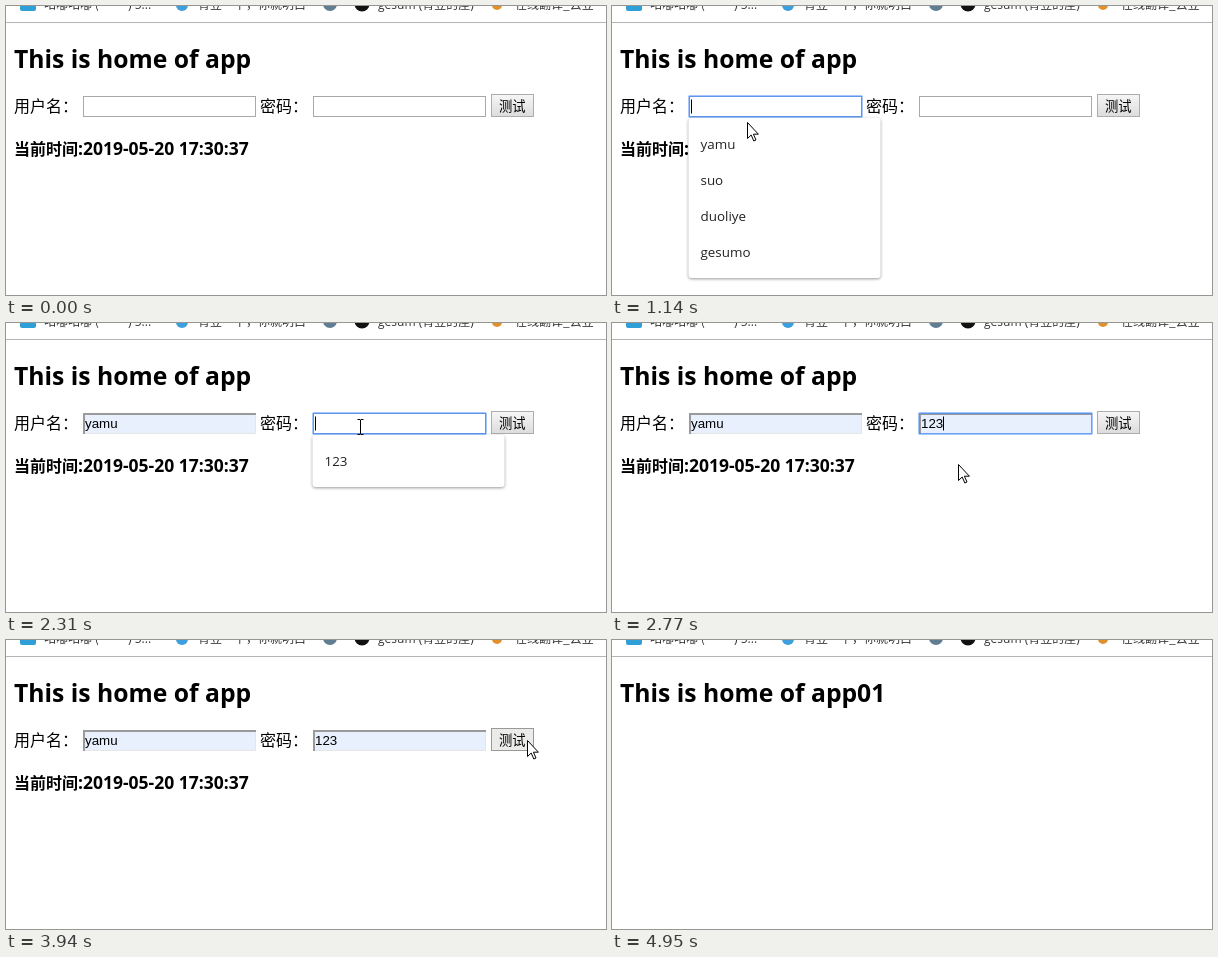
Animation of 600 by 289 pixels, one loop 5.67 s. Source, as an HTML page:

```html
<!DOCTYPE html>
<html lang="zh">
<head>
<meta charset="utf-8">
<style>
  html, body { margin: 0; width: 100%; height: 100%; overflow: hidden; background: #fff; }
  svg { display: block; width: 600px; height: 289px; }
  text { font: 16px "Open Sans", "Noto Sans CJK SC", "Noto Sans CJK", sans-serif; white-space: pre; }
  .cjk { font-family: "Noto Sans CJK SC", "Noto Sans CJK", sans-serif; }
  .bold { font-weight: 700; }
  .bar text { font-size: 12px; fill: #333; }
  .menu { filter: drop-shadow(0 1px 1.5px rgba(0, 0, 0, .4)); }
  .menu text { font-size: 13.4px; fill: #222; }
  .field text { font: 13.33px "Liberation Sans", sans-serif; }
  #button { fill: url(#face); stroke: #adadad; }
  #button.hover { fill: #ebebe9; stroke: #999; }
</style>
</head>
<body>
<svg viewBox="0 0 600 289">
  <defs>
    <linearGradient id="face" x2="0" y2="1">
      <stop stop-color="#f6f6f6"/><stop offset="1" stop-color="#dcdcdc"/>
    </linearGradient>
  </defs>
  <g class="bar">
    <rect x="14" y="-9" width="16" height="14" rx="2" fill="#2f9fd8"/>
    <text class="cjk" x="38" y="3">咕嘟咕嘟 (</text>
    <text x="122" y="3">) 5...</text>
    <circle cx="176" cy="-1" r="6" fill="#3d9fdc"/>
    <text class="cjk" x="192" y="3">青豆一下，你就明白</text>
    <circle cx="324" cy="-2" r="7" fill="#607d92"/>
    <circle cx="356" cy="-2" r="7.5" fill="#111"/>
    <text x="372" y="3">gesum (青豆的屋)</text>
    <circle cx="491" cy="-1" r="5" fill="#e0912c"/>
    <text class="cjk" x="509" y="3">在线翻译_云豆</text>
    <path d="M0 16.5H600" stroke="#b4b4b4"/>
  </g>
  <text id="title" class="bold" x="8" y="62" style="font-size:24.7px"></text>
  <g id="form">
    <text class="cjk" x="8" y="106">用户名：</text>
    <text class="cjk" x="254" y="106">密码：</text>
    <g id="fields"></g>
    <rect id="button" x="485.5" y="88.5" width="42" height="22"/>
    <text class="cjk" x="493" y="105" style="font-size:13.33px">测试</text>
    <text class="cjk bold" x="8" y="149">当前时间</text>
    <text class="bold" x="72" y="149" style="font-size:17.5px">:2019-05-20 17:30:37</text>
    <g id="menus"></g>
  </g>
  <g id="pointer">
    <path id="arrow" d="M.5.5v16l3.7-3.5 2.6 6 2.2-1-2.6-5.8h5z" fill="#fff" stroke="#000"/>
    <path id="beam" d="M-3-7.5h2.5l.5.5.5-.5H3M-3 7.5h2.5L0 7l.5.5H3M0-7V7" fill="none" stroke="#000"/>
  </g>
</svg>
<script>
const LOOP = 5670;
const STEP = 77; // the pointer moves in steps of this many ms
const SUBMIT = 4020;
const $ = id => document.getElementById(id);
const show = (id, on) => $(id).style.display = on ? "" : "none";
const between = (t, a, b) => t >= a && t < b;

const user = { id: "user", x: 77, value: "yamu", options: ["yamu", "suo", "duoliye", "gesumo"],
               opened: 900, hovered: 1215, chosen: 1540, blurred: 2225 };
const pass = { id: "pass", x: 307, value: "123", options: ["123"],
               opened: 2225, hovered: 2455, chosen: 2770, blurred: 3855 };
const fields = [user, pass];

const fieldMarkup = ({ id, x, value }) => `
  <g class="field" transform="translate(${x} 90)">
    <rect x=".5" y=".5" width="172" height="20" fill="#fff" stroke="#a9a9a9"/>
    <g id="${id}Fill">
      <rect width="173" height="21" fill="#e8f0fe"/>
      <path d="M1 21V1H173" fill="none" stroke="#9a9a9a" stroke-width="2"/>
      <path d="M2 20.5H172.5V2" fill="none" stroke="#e6e6e6"/>
      <text id="${id}Text" x="2" y="15">${value}</text>
    </g>
    <g id="${id}Ring" fill="none" stroke="#4d90fe">
      <rect x="-.5" y="-.5" width="174" height="22" rx="1" stroke-opacity=".5"/>
      <rect x=".5" y=".5" width="172" height="20" stroke-opacity=".8"/>
    </g>
    <path id="${id}Caret" d="M.5 3.5v14" stroke="#000"/>
  </g>`;

const menuMarkup = ({ id, x, options }) => `
  <g id="${id}Menu" class="menu" transform="translate(${x - .5} 112)">
    <rect width="192" height="${16 + 36 * options.length}" rx="3" fill="#fff"/>
    <rect id="${id}Hover" y="9" width="192" height="36" fill="#eee"/>
    ${options.map((s, i) => `<text x="12" y="${31 + 36 * i}">${s}</text>`).join("")}
  </g>`;

$("fields").innerHTML = fields.map(fieldMarkup).join("") +
  `<path id="squiggle" d="M79 107${"l2-2 2 2".repeat(8)}" fill="none" stroke="#e0543a" stroke-width=".8"/>`;
$("menus").innerHTML = fields.map(menuMarkup).join("");

// Each move starts where the last one ended; bend pushes its middle sideways.
const moves = [];
let rest = [282, 257];
function move(from, to, goal, bend = [0, 0]) {
  moves.push({ from, to, start: rest, goal, bend });
  rest = goal;
}
move(70, 440, [155, 91]);
move(590, 750, [160, 99]);
move(990, 1300, [114, 140], [-2, -4]);
move(user.chosen, 1860, [180, 115], [-75, 0]);
move(1920, 2310, [354, 104]);
move(2310, 2540, [346, 141]);
move(pass.chosen, 3940, [521, 100], [0, -14]);
move(4190, 4810, [360, 235], [-150, 0]);
move(4810, 4950, [628, 309]);

function pointerAt(t) {
  const { from, to, start, goal, bend } = moves.findLast(m => t >= m.from);
  const steps = Math.round((to - from) / STEP);
  const u = Math.min(1, Math.floor((t - from) / (to - from) * steps + .15) / steps);
  return start.map((s, k) => Math.round(s + (goal[k] - s) * u + bend[k] * 4 * u * (1 - u)));
}

function drawField({ id, opened, hovered, chosen, blurred }, t) {
  const focused = between(t, opened, blurred);
  const caretOn = t < chosen || (t - chosen) % 1000 < 460;
  show(id + "Fill", t >= hovered);
  show(id + "Hover", t >= hovered);
  show(id + "Ring", focused);
  show(id + "Menu", between(t, opened, chosen));
  show(id + "Caret", focused && caretOn);
  const textEnd = t < chosen ? 0 : Math.round($(id + "Text").getComputedTextLength());
  $(id + "Caret").setAttribute("transform", `translate(${2 + textEnd} 0)`);
}

function drawPointer(t) {
  const visible = between(t, 70, 4950);
  show("pointer", visible);
  const [x, y] = visible ? pointerAt(t) : [0, 0];
  const overRow = between(y, 90, 112);
  const overDate = between(y, 134, 152) && x < 243 && !between(t, user.opened, user.chosen);
  const beam = t < SUBMIT && (overRow && x < 481 || overDate);
  show("beam", beam);
  show("arrow", !beam);
  $("pointer").setAttribute("transform", `translate(${x + (beam ? .5 : 0)} ${y})`);
  $("button").classList.toggle("hover", overRow && between(x, 485, 529));
}

function draw(t) {
  $("title").textContent = "This is home of app" + (t < SUBMIT ? "" : "01");
  show("form", t < SUBMIT);
  show("squiggle", between(t, user.chosen, user.blurred));
  fields.forEach(f => drawField(f, t));
  drawPointer(t);
}

const begin = performance.now();
function tick() {
  draw((performance.now() - begin) % LOOP);
  requestAnimationFrame(tick);
}
tick();
</script>
</body>
</html>
```
